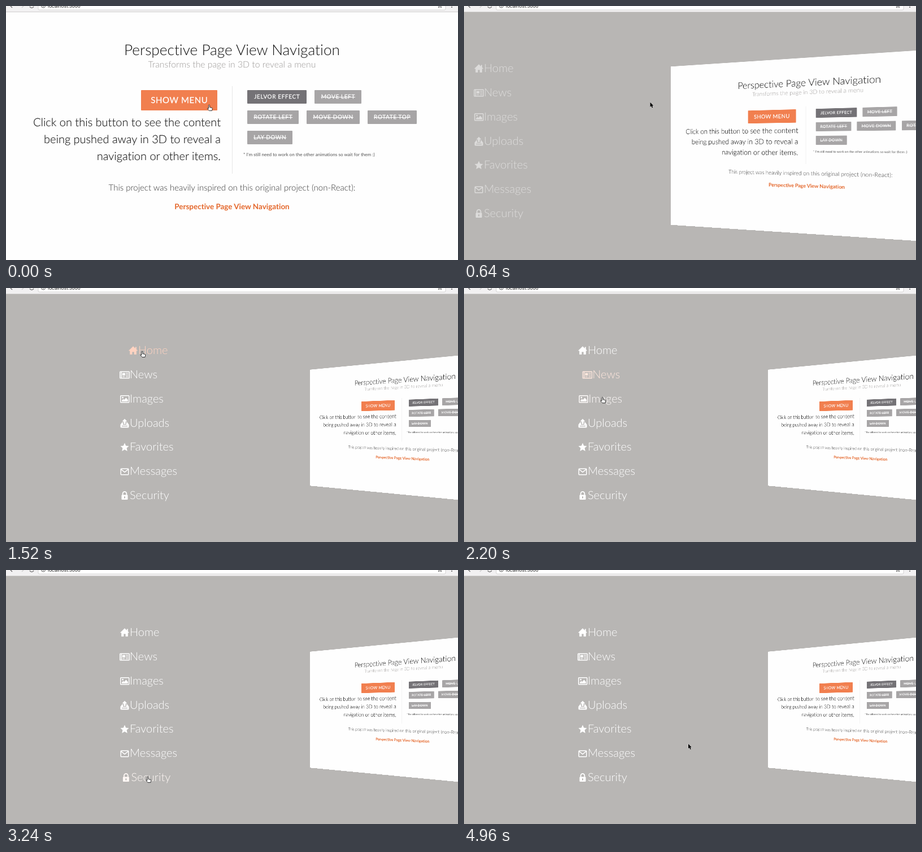
An HTML page that plays this animation: 800x450 px, repeating every 5000 ms.

```html
<!DOCTYPE html>
<html lang="en">
<head>
<meta charset="utf-8">
<title>Perspective Page View Navigation</title>
<style>
html, body { margin: 0; width: 100%; height: 100%; overflow: hidden; }
#stage { position: relative; width: 800px; height: 450px; overflow: hidden; background: #b8b6b4; font-family: Lato, sans-serif; text-rendering: geometricPrecision; font-variant-ligatures: none; }
#stage div, #stage span, #stage svg { position: absolute; }
#world { inset: 0; perspective: 937.5px; perspective-origin: 400px 247.5px; }
#page { left: 0; top: 11px; width: 800px; height: 473px; background: #fefefe; }
#content { left: 0; top: -11px; width: 800px; height: 473px; }

/* A zero line height makes "top" the vertical middle of the text. */
.line { left: 0; width: 800px; text-align: center; line-height: 0; white-space: nowrap; font-weight: 300; }
.button { box-sizing: border-box; height: 24px; line-height: 24px; font-size: 10px; letter-spacing: .625px; text-align: center; text-indent: .6px; white-space: nowrap; color: #fff; background: #a7a5a6; border-radius: 1px; text-decoration: line-through; -webkit-text-stroke: .25px; }
.active { background: #747276; text-decoration: none; }
#show { left: 239px; top: 149px; width: 135px; height: 36px; line-height: 36px; font-size: 15px; background: #f17f4f; text-decoration: none; }
#intro { right: 420px; top: 191px; text-align: right; font-size: 20px; line-height: 30px; font-weight: 300; white-space: nowrap; color: #1c1c1c; -webkit-text-stroke: .15px; }
#divider { left: 400px; top: 142px; width: 1px; height: 155px; background: #e6e6e6; }

#menu { left: 0; top: 0; }
.item { left: 201px; height: 0; color: #fff; font-size: 20px; font-weight: 300; line-height: 0; white-space: nowrap; }
.item svg { left: 0; top: -8px; width: 18px; height: 18px; fill: currentColor; fill-rule: evenodd; }
.item span { left: 18px; top: 0; }

#bar { left: 0; top: 0; width: 800px; height: 10px; background: #f2f1f2; border-bottom: 1px solid #cfcdcd; }
</style>
</head>
<body>
<div id="stage">
  <div id="menu"></div>
  <div id="world">
    <div id="page"><div id="content">
      <div class="line" style="top:76.5px; font-size:26.25px; color:#111">Perspective Page View Navigation</div>
      <div class="line" style="top:103.5px; font-size:15.75px; color:#9b9896">Transforms the page in 3D to reveal a menu</div>
      <div class="button" id="show">SHOW MENU</div>
      <div id="intro">Click on this button to see the content<br>being pushed away in 3D to reveal a<br>navigation or other items.</div>
      <div id="divider"></div>
      <div class="button active" style="left:427px; top:148.5px; width:105px">JELVOR EFFECT</div>
      <div class="button" style="left:546px; top:148.5px; width:83px">MOVE LEFT</div>
      <div class="button" style="left:427px; top:184.5px; width:91px">ROTATE LEFT</div>
      <div class="button" style="left:532px; top:184.5px; width:93.5px">MOVE DOWN</div>
      <div class="button" style="left:639.5px; top:184.5px; width:87.5px">ROTATE TOP</div>
      <div class="button" style="left:427px; top:220.5px; width:80px">LAY DOWN</div>
      <div class="line" style="left:420px; top:263px; text-align:left; font-size:8.125px; font-weight:400; color:#555">* I'm still need to work on the other animations so wait for them :)</div>
      <div class="line" style="top:321.5px; font-size:15px; color:#333">This project was heavily inspired on this original project (non-React):</div>
      <div class="line" style="top:355px; font-size:13.45px; font-weight:700; color:#e4672b">Perspective Page View Navigation</div>
    </div></div>
  </div>
  <div id="bar">
    <svg width="800" height="10" fill="none" stroke="#666" stroke-width="1.2">
      <rect x="57" y="-10" width="721" height="17" rx="2" fill="#fff" stroke="#d4d2d2" stroke-width="1"/>
      <path d="M7-1 11 3"/>
      <path d="M32-1 28 3" stroke="#ccc"/>
      <path d="M42 1a3.8 3.8 0 0 0 7 0"/>
      <circle cx="66" cy="-.5" r="3.6" stroke-width="1"/>
      <path d="M66-2V1.5"/>
      <path d="M765.5 3 768 1.2 770.5 3 769.8 0M766.2 0 765.5 3" stroke-width="1"/>
      <circle cx="789" cy="2" r="1.1" fill="#666" stroke="none"/>
      <text x="74" y="3" fill="#333" stroke="none" font-family="Roboto, sans-serif" font-size="8.75">localhost:3000</text>
    </svg>
  </div>
  <svg width="800" height="450" style="left:0; top:0">
    <g id="cursor" stroke-linejoin="round">
      <path id="arrow" d="M0 0v8.6l2-1.8 1.4 3.1 1.5-.7-1.4-3H6z" fill="#000" stroke="#fff" stroke-width=".7" paint-order="stroke"/>
      <path id="hand" d="M-1 1.2a1 1 0 0 1 2 0V4.500l4 .9q1 .3.8 1.4L5 10.500H0L-3 7q-.4-1 .8-1l1.2.8z" fill="#fff" stroke="#222" stroke-width=".9"/>
    </g>
  </svg>
</div>
<script>
const LOOP = 5000;
const OPEN_START = 443, OPEN_TIME = 740;
const HOVER_TIME = 400, HOVER_SHIFT = 16;

// label, hover start, hover end, icon in an 18 by 18 box
const items = [
  ['Home', 1240, 1740, 'M9 1.2.8 9.2h2.4v6.6h4.2v-4.6h3.2v4.6h4.2V9.2h2.4L14.8 6.8V2.4h-2v2.5z'],
  ['News', 1860, 2090, 'M1.5 2.5h15q1.5 0 1.5 1.5v10q0 1.5-1.5 1.5h-15Q0 15.5 0 14V4q0-1.5 1.5-1.5zM1.5 4v10h1V4zM4 4v10h12.5V4zM5 5.5h5v4.5H5zM11 5.5h4.5v1.2H11zM11 8.5h4.5v1.2H11zM5 11.5h4.5v1.2H5zM11 11.5h4.5v1.2H11z'],
  ['Images', 2165, 2440, 'M2.5 2h13.5q1.5 0 1.5 1.5v10.5q0 1.5-1.5 1.5H2.5Q1 15.5 1 14V3.5Q1 2 2.5 2zM2.5 3.5v10.5H16V3.5zM4 13v-2l2.5-2.5 1.7 1.6L11.5 6.5 14.8 10v3zM4.2 6.2a1.4 1.4 0 1 1 2.8 0 1.4 1.4 0 1 1-2.8 0z'],
  ['Uploads', 2470, 2610, 'M9 .8 4.5 5.5H7.3V10h3.4V5.5h2.8zM4.5 7H6v4.2h6V7h1.5l3 4v4q0 1.5-1.5 1.5H3Q1.5 16.5 1.5 15v-4zM4 13v1.3h10V13z'],
  ['Favorites', 2640, 2760, 'M9 1.5 11.2 6.4 16.5 7 12.6 10.6 13.7 16 9 13.3 4.3 16 5.4 10.6 1.5 7 6.8 6.4z'],
  ['Messages', 2780, 2840, 'M3 3.5h12q1.5 0 1.5 1.5v9q0 1.5-1.5 1.5H3Q1.5 15.5 1.5 14V5Q1.5 3.5 3 3.5zM3.5 5 9 9.3 14.5 5zM3 6.5V14h12V6.5L9 11.2z'],
  ['Security', 3188, 3840, 'M4.7 7.5V5.2a4.3 4.3 0 0 1 8.6 0V7.5h.2q1 0 1 1V15q0 1-1 1h-9q-1 0-1-1V8.5q0-1 1-1zM6.5 7.5h5V5.2a2.5 2.5 0 0 0-5 0zM8 10.2v3.4h2v-3.4z'],
];

// time, x, y of the pointer's tip
const pointerPath = [
  [480, 359.5, 175], [640, 329.5, 170.5], [1040, 329.5, 170.5], [1360, 241, 112],
  [1720, 241, 112], [2060, 244, 152], [2200, 245, 193], [2680, 248, 284],
  [2860, 249, 340], [3240, 251, 366], [3560, 253, 369], [3680, 253, 369], [4500, 397, 308],
];

const byId = id => document.getElementById(id);
const clamp = v => Math.min(1, Math.max(0, v));
const bezier = (a, b, s) => 3 * a * s * (1 - s) ** 2 + 3 * b * s * s * (1 - s) + s ** 3;

function cubicEase(x1, y1, x2, y2) {
  return v => {
    const x = clamp(v);
    let low = 0, high = 1;
    for (let i = 0; i < 24; i++) {
      const mid = (low + high) / 2;
      if (bezier(x1, x2, mid) < x) low = mid; else high = mid;
    }
    return x === 0 ? 0 : x === 1 ? 1 : bezier(y1, y2, low);
  };
}
const openEase = cubicEase(.16, .1, .25, 1);
const hoverEase = cubicEase(.25, .1, .25, 1);

const links = items.map(([label, enter, leave, icon], i) => {
  const node = document.createElement('div');
  node.className = 'item';
  node.style.top = 110.4 + i * 42.7 + 'px';
  node.innerHTML = `<svg viewBox="0 0 18 18"><path d="${icon}"/></svg><span>${label}</span>`;
  byId('menu').append(node);
  return { node, enter, leave };
});

function pointerAt(t) {
  const next = pointerPath.findIndex(key => key[0] > t);
  if (next === 0) return pointerPath[0].slice(1);
  if (next < 0) return pointerPath.at(-1).slice(1);
  const [t0, x0, y0] = pointerPath[next - 1], [t1, x1, y1] = pointerPath[next];
  const k = (t - t0) / (t1 - t0);
  return [x0 + (x1 - x0) * k, y0 + (y1 - y0) * k];
}

function draw(t) {
  const open = openEase((t - OPEN_START) / OPEN_TIME);
  byId('page').style.transform =
    `translateZ(${-937.5 * open}px) translateX(${600 * open}px) rotateY(${-45 * open}deg)`;
  byId('menu').style.opacity = open;
  byId('menu').style.transform = `translateX(${381 * (open - 1)}px)`;

  for (const { node, enter, leave } of links) {
    const hover = hoverEase((t - enter) / HOVER_TIME) - hoverEase((t - leave) / HOVER_TIME);
    node.style.transform = `translateX(${HOVER_SHIFT * hover}px)`;
    node.style.color = `rgb(255, ${255 - 47 * hover}, ${255 - 66 * hover})`;
  }

  const overLink = t < 520 || (t >= items[0][1] && t < items[6][2]);
  byId('hand').style.display = overLink ? '' : 'none';
  byId('arrow').style.display = overLink ? 'none' : '';
  byId('cursor').setAttribute('transform', `translate(${pointerAt(t)})`);
}

function tick() {
  draw(performance.now() % LOOP);
  requestAnimationFrame(tick);
}
tick();
</script>
</body>
</html>
```
